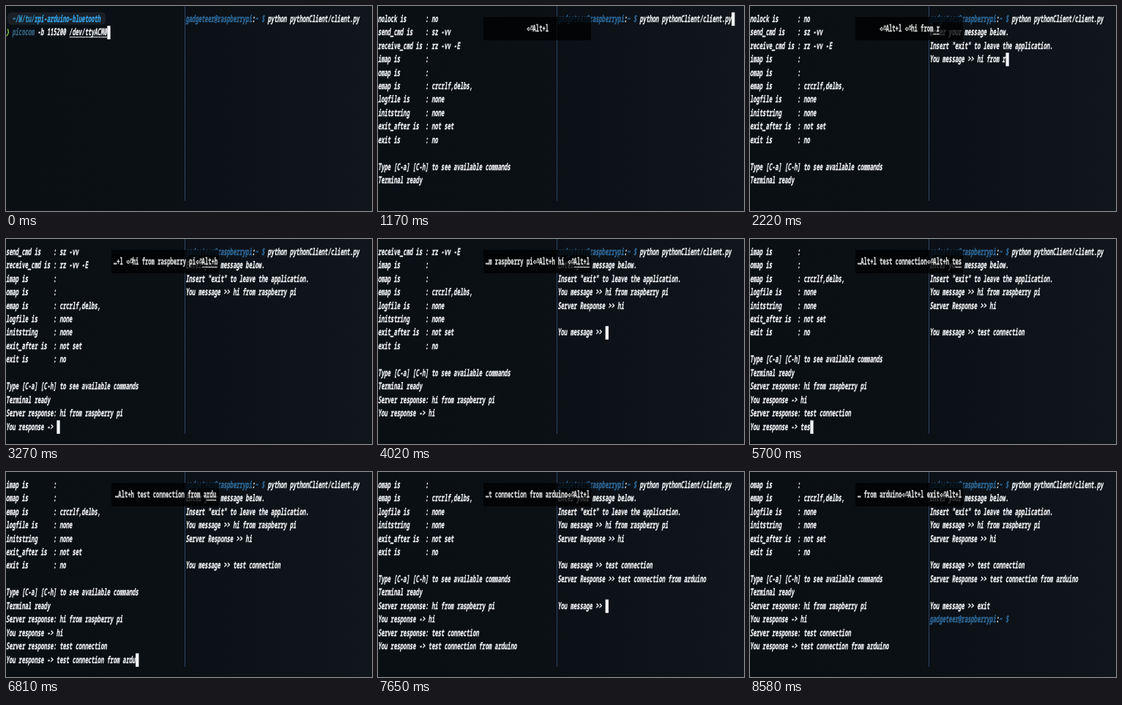
These frames come from a looping animation (500 px wide and 281 px high, 8.76 s). An HTML page with a canvas:

```html
<!DOCTYPE html>
<html lang="en">
<head>
<meta charset="utf-8">
<title>Two-pane terminal</title>
<style>
html, body { margin: 0; width: 100%; height: 100%; overflow: hidden; background: #0a0f14; }
canvas { display: block; }
</style>
</head>
<body>
<canvas id="stage" width="500" height="281"></canvas>
<script>
const ctx = document.getElementById('stage').getContext('2d');
const LOOP = 8760, ROWS = 14, TOP = 8.7, ROW = 18.45, CELL = 4.31, SIZE = 13;
const SQUEEZE = CELL / (SIZE * 0.6); // the whole terminal is shown narrowed
const SLANT = 0.13, MIDDLE = 4;      // italics lean around the middle of the letters
const MONO = `bold ${SIZE}px "Noto Sans Mono", "DejaVu Sans Mono", monospace`;
const CAPTION_CELLS = 33, RECENT = 120, BLINK_OFF = 8580;

// "§x" inside a line switches to colour x; "u" is also underlined
const COLORS = {
  w: '#f2f4f6', u: '#f2f4f6', c: '#2f6a9c', d: '#34637f',
  p: '#3193c8', P: '#35a5ea', g: '#8fd14a'
};
const PROMPT = '§cgadgeteer@raspberrypi§w:§c~ $ §w';

const backdrop = ctx.createLinearGradient(0, 0, 500, 0);
backdrop.addColorStop(0, '#0a0f14');
backdrop.addColorStop(0.45, '#0b1015');
backdrop.addColorStop(1, '#10161b');

const keys = [];
const left = { x: 0.4, log: [] };
const right = { x: 246, log: [] };

const press = (t, label) => keys.push({ t, label });
const print = (pane, t, text) => pane.log.push({ t, text });
const enter = (pane, t) => { press(t, '⏎'); print(pane, t, '\n'); };
const type = (pane, t, step, text) => [...text].forEach((ch, i) => {
  press(t + i * step, ch);
  print(pane, t + i * step, ch);
});

const settings = `port is: /dev/ttyACM0
flowcontrol: none
baudrate is: 115200
parity is: none
databits are: 8
stopbits are: 1
escape is: C-a
local echo is: no
noinit is: no
noreset is: no
hangup is: no
nolock is: no
send_cmd is: sz -vv
receive_cmd is: rz -vv -E
imap is:
omap is:
emap is: crcrlf,delbs,
logfile is: none
initstring: none
exit_after is: not set
exit is: no`.replace(/^[^:]+/gm, name => name.padEnd(15));

print(left, 0, '  §p~/W/tu/§Prpi-arduino-bluetooth\n§g❯ §dpicocom§w -b 115200 §u/dev/ttyACM0§w');
print(right, 0, PROMPT + 'python pythonClient/client.py');

enter(left, 90);
print(left, 150, `picocom v3.1\n\n${settings}\n\nType [C-a] [C-h] to see available commands\n`);
print(left, 180, 'Terminal ready\n');

press(1020, 'Alt+l ');
enter(right, 1320);
print(right, 1500, 'Enter your message below.\nInsert "exit" to leave the application.\nYou message >> ');
type(right, 1720, 60, 'hi from r');
type(right, 2260, 58, 'aspberry pi');
enter(right, 2940);
print(left, 3000, 'Server response: hi from raspberry pi\nYou response -> ');

press(3240, 'Alt+h ');
type(left, 3480, 70, 'hi ');
enter(left, 3750);
print(right, 3840, 'Server Response >> hi\n\nYou message >> ');

press(3990, 'Alt+l ');
type(right, 4440, 45, 'test connection');
enter(right, 5160);
print(left, 5220, 'Server response: test connection\nYou response -> ');

press(5400, 'Alt+h ');
type(left, 5580, 51, 'test connection from arduino');
enter(left, 7080);
print(right, 7140, 'Server Response >> test connection from arduino\n\nYou message >> ');

press(7320, 'Alt+l ');
type(right, 7740, 60, 'exit');
enter(right, 8040);
print(right, 8130, PROMPT);
press(8400, 'Alt+l ');

function glyph(ch, x, y, color, slant = 0) {
  ctx.save();
  ctx.fillStyle = ctx.strokeStyle = color;
  ctx.lineWidth = 0.35;
  if (ch === '⏎') {
    ctx.translate(x, y);
    ctx.font = '11px "DejaVu Sans", sans-serif';
  } else {
    ctx.transform(SQUEEZE, 0, -slant, 1, x - slant * MIDDLE, y);
    ctx.font = MONO;
  }
  ctx.fillText(ch, 0, 0);
  ctx.strokeText(ch, 0, 0);
  ctx.restore();
}

function drawLine(line, x, top) {
  let col = 0, style = 'w';
  if (line.includes('§p')) {
    ctx.fillStyle = '#1a2026';
    ctx.beginPath();
    ctx.roundRect(2, top, 134, 17, 5);
    ctx.fill();
  }
  for (let i = 0; i < line.length; i++) {
    if (line[i] === '§') { style = line[++i]; continue; }
    const cx = x + col++ * CELL;
    glyph(line[i], cx, top + 13, COLORS[style], SLANT);
    if (style === 'u') {
      ctx.fillStyle = COLORS.u;
      ctx.fillRect(cx, top + 15, CELL, 1);
    }
  }
  return x + col * CELL;
}

function drawPane(pane, t, focused) {
  const text = pane.log.filter(e => e.t <= t).map(e => e.text).join('');
  const lines = text.split('\n').slice(-ROWS);
  let end = 0;
  lines.forEach((line, r) => { end = drawLine(line, pane.x, TOP + r * ROW); });
  if (focused) {
    ctx.fillStyle = '#f4f6f8';
    ctx.fillRect(end, TOP + (lines.length - 1) * ROW, CELL, ROW);
  }
}

function drawCaption(pressed, t) {
  if (!pressed.length) return;
  ctx.fillStyle = 'rgba(0, 0, 0, 0.78)';
  ctx.fillRect(144, 15, 147, 32);

  const width = cells => cells.reduce((sum, c) => sum + c.w, 0);
  let cells = pressed.flatMap(k => [...k.label].map(ch =>
    ({ ch, w: ch === '⏎' ? 2 : 1, recent: t - k.t < RECENT })));
  while (cells.at(-1).ch === ' ') cells.pop();
  if (width(cells) > CAPTION_CELLS) {
    while (width(cells) > CAPTION_CELLS - 1) cells.shift();
    cells.unshift({ ch: '…', w: 1 });
  }

  const color = '#dcdcdc';
  let x = 218 - width(cells) * CELL / 2;
  for (const { ch, w, recent } of cells) {
    glyph(ch, x, 35, color);
    if (recent) {
      ctx.fillStyle = color;
      ctx.fillRect(x, 38, w * CELL, 1);
    }
    x += w * CELL;
  }
}

function frame(now) {
  const t = now % LOOP;
  const pressed = keys.filter(k => k.t <= t);
  const onRight = pressed.filter(k => k.label.startsWith('Alt')).length % 2 === 1;

  ctx.fillStyle = backdrop;
  ctx.fillRect(0, 0, 500, 281);
  ctx.fillStyle = '#2f4464';
  ctx.fillRect(244, 0, 1, 267);
  drawPane(left, t, !onRight && t < BLINK_OFF);
  drawPane(right, t, onRight);
  drawCaption(pressed, t);
  requestAnimationFrame(frame);
}
requestAnimationFrame(frame);
</script>
</body>
</html>
```
